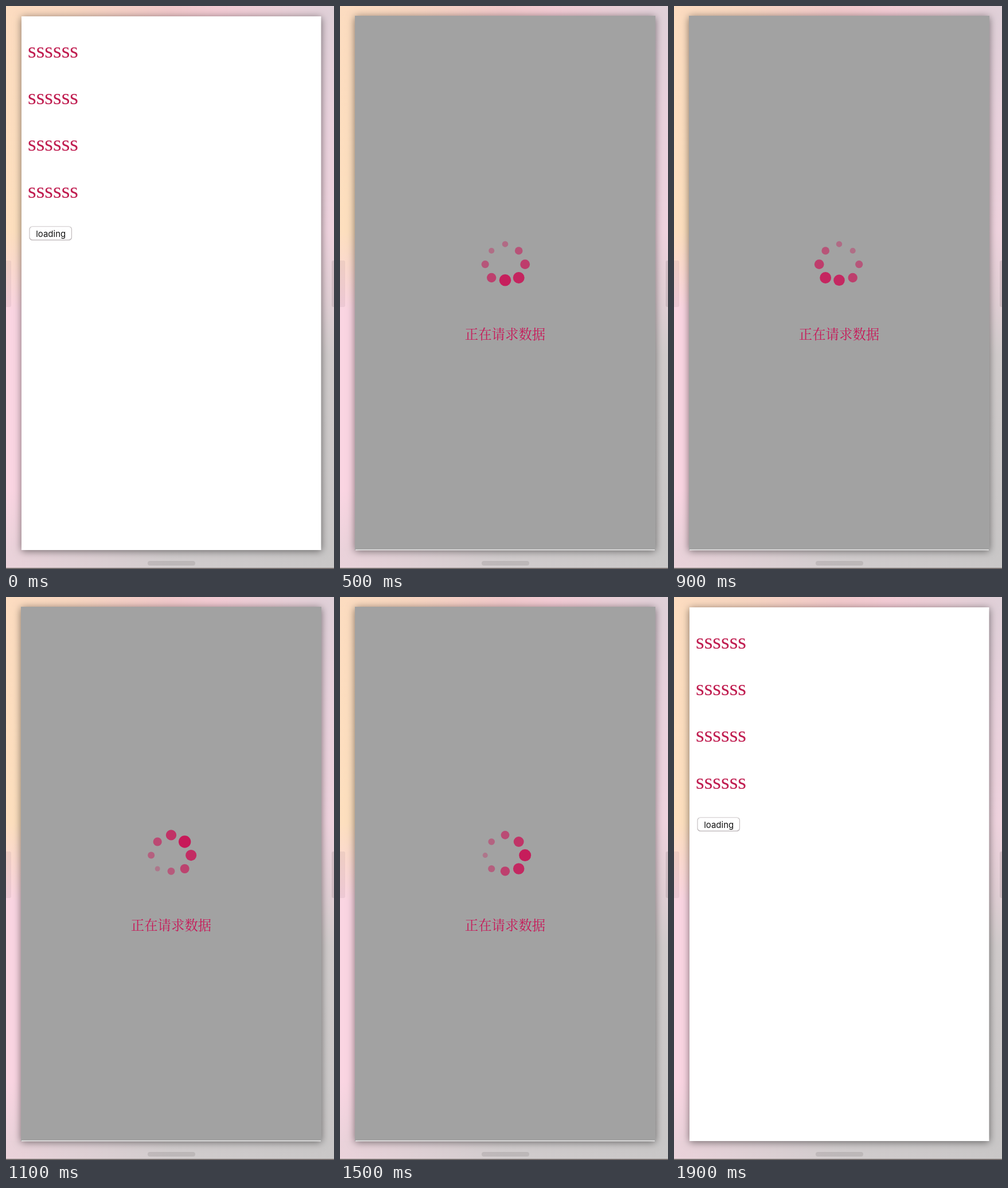
Write an HTML page with a canvas that moves like this. It is 572 px wide and 980 px high and loops after 2 s.

```html
<!DOCTYPE html>
<html lang="zh">
<head>
<meta charset="utf-8">
<title>Loading</title>
<style>
  html, body { margin: 0; width: 100%; height: 100%; overflow: hidden; }
  canvas { display: block; width: 572px; height: 980px; }
</style>
</head>
<body>
<canvas id="stage" width="572" height="980"></canvas>
<script>
const ctx = document.getElementById('stage').getContext('2d');
const W = 572, H = 980, LOOP = 2000, STEP = 100;
const PINK = '#c81758';

// Balls run counter-clockwise from the bottom one.
const balls = [
  [288, 477.3], [311.7, 473], [322.7, 449.6], [311.7, 426],
  [288, 414.4], [264.2, 426], [253.2, 449.6], [264.2, 473]
];
const BALL_R = 10.9, DELAY = 0.12;

function gradient(x, y, stops) {
  const g = ctx.createLinearGradient(0, 0, x, y);
  stops.forEach(([at, color]) => g.addColorStop(at, color));
  return g;
}

function box(x, y, w, h, fill) {
  ctx.fillStyle = fill;
  ctx.fillRect(x, y, w, h);
}

function rounded(x, y, w, h, r, fill) {
  ctx.beginPath();
  ctx.roundRect(x, y, w, h, r);
  ctx.fillStyle = fill;
  ctx.fill();
}

function text(str, x, y, font, color, align) {
  ctx.font = font;
  ctx.fillStyle = color;
  ctx.textAlign = align;
  ctx.fillText(str, x, y);
}

function drawBackdrop() {
  box(0, 0, W / 2, H, gradient(0, H, [
    [0, '#fcdcc0'], [0.4, '#fddfbe'], [0.47, '#fbd9d0'],
    [0.54, '#fad5e2'], [0.86, '#fad5e2'], [0.97, '#ead2da'], [1, '#e2d0d6']
  ]));
  box(W / 2, 0, W / 2, H, gradient(0, H, [
    [0, '#dfd0d8'], [0.2, '#ead2dd'], [0.4, '#efd3de'],
    [0.52, '#e2cfd5'], [0.62, '#d0cbcb'], [1, '#c9c7c7']
  ]));
  box(0, 0, W, 18, gradient(W, 0, [
    [0, '#fcdcc0'], [0.2, '#f8d6c0'], [0.5, '#f2c9cb'],
    [0.65, '#f3cbd4'], [0.87, '#e8d0d8'], [1, '#dfd0d8']
  ]));
  box(0, 947, W, 33, gradient(W, 0, [
    [0, '#ead2da'], [0.2, '#e0d0d5'], [0.5, '#d1cccd'], [1, '#c9c7c7']
  ]));
  rounded(-6, 443, 15, 81, 3, 'rgba(150,120,130,0.13)');
  rounded(568, 443, 10, 81, 3, 'rgba(130,115,120,0.2)');
  rounded(247, 966, 83, 8, 4, 'rgba(120,115,115,0.22)');
  box(0, 978, W, 2, '#77706f');
}

function drawPanel(x, y, w, h, fill) {
  ctx.save();
  ctx.shadowColor = 'rgba(0,0,0,0.5)';
  ctx.shadowBlur = 13;
  ctx.shadowOffsetY = 2;
  box(x, y, w, h, fill);
  ctx.restore();
}

function drawPage() {
  drawPanel(27, 18, 522.5, 929, '#fff');
  for (let i = 0; i < 4; i++) {
    text('ssssss', 38, 89.7 + i * 81.3,
      '37.7px "Liberation Serif", Times, serif', '#c01d50', 'left');
  }
  rounded(40.5, 383.5, 74.5, 24.5, 5.5, '#b9b3b5');
  rounded(41.5, 384.3, 72.5, 22.4, 4.7, '#fff');
  text('loading', 78.2, 401.7, '15px Inter, sans-serif', '#111', 'center');
}

function drawLoader(time) {
  drawPanel(26, 17, 524, 930, '#a2a2a2');
  box(27, 946, 522, 1.4, '#eee');
  balls.forEach(([x, y], i) => {
    const age = Math.max(0, time - i * DELAY);
    const dip = 1 - Math.abs(1 - 2 * (age % 1));
    ctx.globalAlpha = 1 - 0.7 * dip;
    ctx.beginPath();
    ctx.arc(x, y, BALL_R * (1 - 0.6 * dip), 0, Math.PI * 2);
    ctx.fillStyle = PINK;
    ctx.fill();
  });
  ctx.globalAlpha = 1;
  text('正在请求数据', 288, 579.5,
    '300 23.4px "Noto Serif CJK SC", "Noto Sans CJK SC", "Noto Sans CJK", serif',
    PINK, 'center');
}

function draw(now) {
  const step = Math.floor((now % LOOP) / STEP);
  drawBackdrop();
  if (step === 0 || step === 19) drawPage();
  else drawLoader(0.185 + 0.216 * (step - 1));
}

const start = performance.now();
function tick() {
  draw(performance.now() - start);
  requestAnimationFrame(tick);
}
tick();
</script>
</body>
</html>
```
